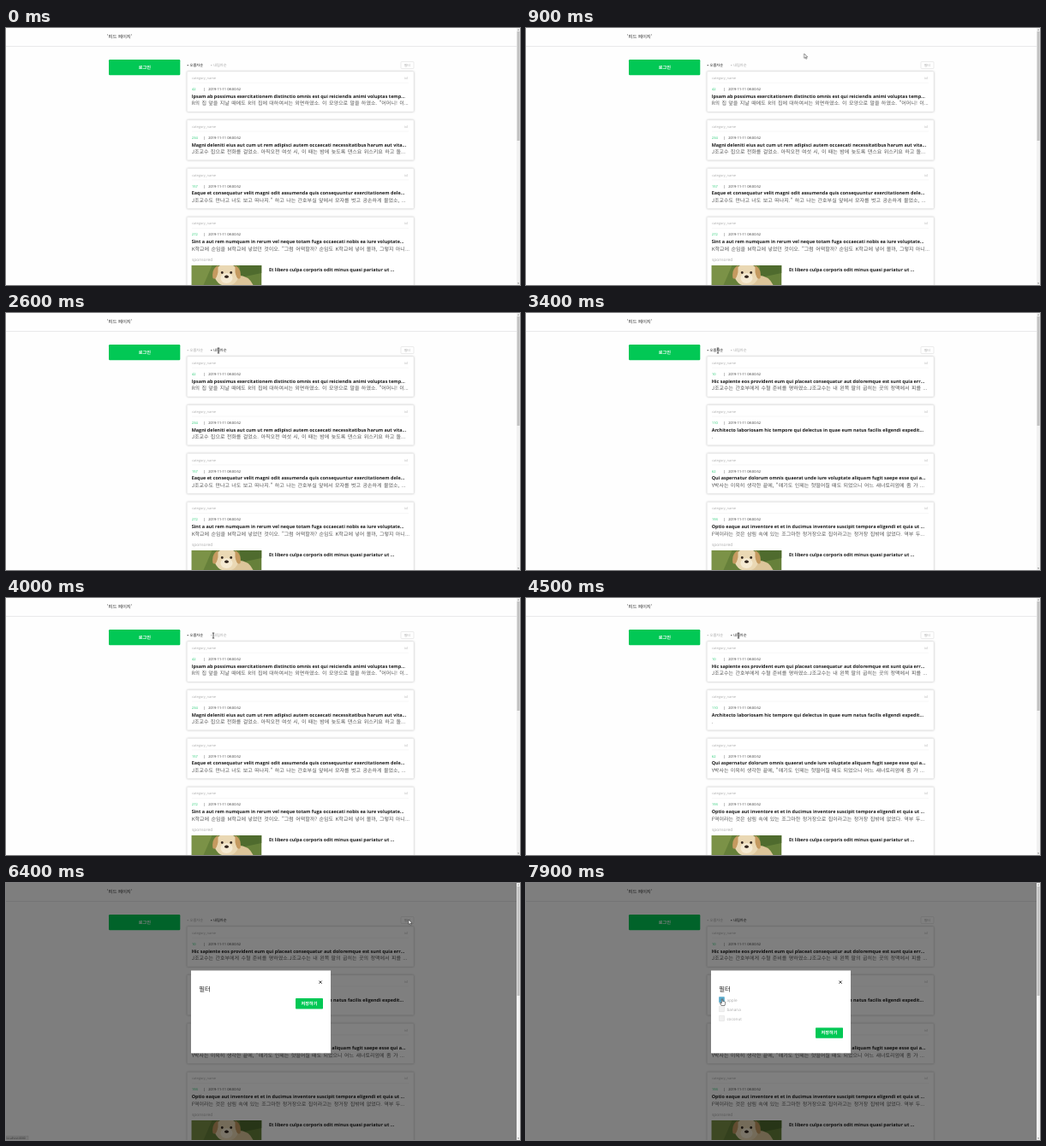
An HTML page for the animation above (8 s loop, 600 px wide and 301 px high).

```html
<!DOCTYPE html>
<html lang="ko">
<head>
<meta charset="utf-8">
<title>피드 페이지</title>
<style>
html, body { margin: 0; width: 100%; height: 100%; overflow: hidden; background: #fefefe; }
svg { display: block; width: 100vw; height: 100vh; }
text { font: 5.4px 'Noto Sans CJK KR', 'Noto Sans CJK', sans-serif; text-rendering: geometricPrecision; fill: #333; }
.latin { font-family: 'Open Sans', 'Noto Sans', sans-serif; }
.title { font-size: 5.45px; font-weight: 700; fill: #1c1c1c; }
.body { font-size: 6px; word-spacing: .12em; fill: #555; }
.meta { font-size: 3.95px; fill: #aaa; }
.date { font-size: 4.03px; }
.count { fill: #12c667; }
.button { fill: #02c855; }
.on-button { font-weight: 700; font-size: 5.2px; fill: #fff; text-anchor: middle; }
.tab text { font-size: 4.25px; fill: inherit; }
.card { fill: #fff; stroke: #e6e6e6; stroke-width: .5; filter: drop-shadow(0 .7px 1px rgba(0, 0, 0, .24)); }
.option { font-size: 4.7px; fill: #aaa; }

/* 100 ms = 1.25% of the loop */
.list, .tab, .timed { animation: 8s step-end infinite; }
#oldest { animation-name: oldest; }
#newest { animation-name: newest; }
#asc { animation-name: asc; }
#desc { animation-name: desc; }
#status { animation-name: status; }
#modal { animation-name: modal; }
#options { animation-name: options; }
#save { animation-name: save; }
#check { animation-name: check; }
#arrow { animation-name: arrow; }
#beam { animation-name: beam; }
#hand { animation-name: hand; }
#pointer { animation: pointer 8s infinite; }

@keyframes oldest { 0%, 45% { visibility: visible } 33.75%, 56.25%, 100% { visibility: hidden } }
@keyframes newest { 0%, 45% { visibility: hidden } 33.75%, 56.25%, 100% { visibility: visible } }
@keyframes asc { 0%, 42.5% { fill: #222 } 31.25%, 53.75%, 100% { fill: #aaa } }
@keyframes desc { 0%, 42.5% { fill: #aaa } 31.25%, 53.75%, 100% { fill: #222 } }
@keyframes status { 0%, 83.75%, 100% { visibility: hidden } 73.75% { visibility: visible } }
@keyframes modal { 0% { visibility: hidden } 80%, 100% { visibility: visible } }
@keyframes options { 0% { visibility: hidden } 82.5%, 100% { visibility: visible } }
@keyframes save { 0% { transform: translateY(0) } 82.5%, 100% { transform: translateY(34.3px) } }
@keyframes check { 0% { fill: #f1f1f1; stroke: #ddd } 98.75%, 100% { fill: #58a9cb; stroke: #58a9cb } }
@keyframes arrow { 0%, 16.25%, 73.75%, 91.25%, 100% { visibility: hidden } 5%, 62.5%, 80% { visibility: visible } }
@keyframes beam { 0%, 62.5%, 100% { visibility: hidden } 16.25% { visibility: visible } }
@keyframes hand { 0%, 80% { visibility: hidden } 73.75%, 91.25%, 100% { visibility: visible } }
@keyframes pointer {
  0% { transform: translate(508px, 196px); animation-timing-function: step-end }
  5% { transform: translate(508px, 196px); animation-timing-function: steps(3, jump-none) }
  8.75% { transform: translate(375px, 23px) }
  10% { transform: translate(375px, 23px); animation-timing-function: steps(6, start) }
  17.5% { transform: translate(224px, 44px) }
  20% { transform: translate(224px, 44px); animation-timing-function: steps(3, start) }
  23.75% { transform: translate(248px, 44px) }
  35% { transform: translate(248px, 44px); animation-timing-function: steps(4, start) }
  40% { transform: translate(224px, 44px) }
  47.5% { transform: translate(224px, 44px); animation-timing-function: steps(4, start) }
  52.5% { transform: translate(248px, 44px) }
  61.25% { transform: translate(248px, 44px); animation-timing-function: steps(9, start) }
  72.5% { transform: translate(484px, 46px); animation-timing-function: steps(3, start) }
  76.25% { transform: translate(470px, 43px) }
  81.25% { transform: translate(470px, 43px); animation-timing-function: steps(8, start) }
  91.25%, 100% { transform: translate(229px, 136px) }
}
</style>
</head>
<body>
<svg viewBox="0 0 600 301" preserveAspectRatio="none">
  <rect width="600" height="301" fill="#fefefe"/>
  <path d="M0 21.5H596" stroke="#e4e4e6" stroke-width=".8"/>
  <text x="118" y="12.2">'피드 페이지'</text>
  <rect class="button" x="120" y="37" width="83.3" height="18.3" rx="1.2"/>
  <text class="on-button" x="162" y="48">로그인</text>

  <g class="tab" id="asc"><circle cx="212.2" cy="43.7" r=".6"/><text x="214.5" y="45.2">오름차순</text></g>
  <g class="tab" id="desc"><circle cx="239.8" cy="43.7" r=".6"/><text x="242" y="45.2">내림차순</text></g>
  <rect x="461" y="39.5" width="15" height="8" rx="1" fill="#fff" stroke="#ddd" stroke-width=".6"/>
  <text class="meta" x="464.7" y="45.1">필터</text>

  <g id="cards"></g>
  <g class="list" id="oldest"></g>
  <g class="list" id="newest"></g>

  <text class="latin" x="217" y="273" style="font-size:4.9px;fill:#aaa">sponsored</text>
  <text class="latin title" x="307" y="284.6">Et libero culpa corporis odit minus quasi pariatur ut ...</text>
  <svg x="216.5" y="278" width="82" height="23" viewBox="0 0 82 23">
    <rect width="82" height="23" fill="#66803a"/>
    <path d="M0 0H24L14 23H0Z" fill="#7b9247"/>
    <path d="M56 0H82V9L58 14Z" fill="#4f6b2e"/>
    <path d="M50 12Q66 10 72 23H44Z" fill="#dcc59a"/>
    <ellipse cx="41" cy="11" rx="14" ry="13" fill="#ead8b4"/>
    <path d="M31 0Q23 4 25 15Q29 18 31 8ZM51 0Q59 4 57 15Q53 18 51 8Z" fill="#c59a60"/>
    <ellipse cx="41" cy="15" rx="7" ry="6" fill="#f5ead2"/>
    <g fill="#33271f"><circle cx="35.8" cy="8.5" r="1.4"/><circle cx="46.2" cy="8.5" r="1.4"/><ellipse cx="41" cy="13.2" rx="2.4" ry="1.7"/></g>
  </svg>

  <g class="timed" id="status">
    <rect x="-1" y="296.3" width="27" height="6" fill="#eee" stroke="#ccc" stroke-width=".4"/>
    <text class="latin" x=".5" y="300" style="font-size:3.3px;fill:#666">localhost:8080</text>
  </g>

  <g class="timed" id="modal">
    <rect width="596" height="301" opacity=".5"/>
    <rect x="216" y="102.5" width="163" height="96.8" fill="#fff"/>
    <text x="225.2" y="127" style="font-size:7.4px;font-weight:500;fill:#222">필터</text>
    <path d="M365.5 114.6l3.2 3.2m0-3.2l-3.2 3.2" stroke="#222" stroke-width=".9"/>
    <g class="timed" id="save">
      <rect class="button" x="338" y="135" width="32" height="12.5" rx=".8"/>
      <text class="on-button" x="354" y="143.2">저장하기</text>
    </g>
  </g>
  <g class="timed" id="options"></g>

  <rect x="596" width="4" height="301" fill="#f1f1f1"/>
  <rect x="596.6" y="4" width="3" height="128" fill="#c1c1c1"/>
  <path d="M597 2.6l1.1-1.3 1.1 1.3ZM597 298.6l1.1 1.3 1.1-1.3Z" fill="#777"/>

  <g id="pointer" stroke-linejoin="round">
    <path class="timed" id="arrow" d="M0 0V5.4L1.3 4.3 2.2 6.3 3.1 5.9 2.2 4H4Z" fill="#fff" stroke="#222" stroke-width=".5"/>
    <path class="timed" id="beam" d="M-1.2-3H1.2M0-3V3M-1.2 3H1.2" stroke="#222" stroke-width=".7"/>
    <path class="timed" id="hand" d="M-.7 0Q0-.8.7 0V2.6Q2.8 2.4 3.6 3.4V5.5L2.9 7.6H-.9L-2.6 4.6Q-2.3 3.7-.7 4.9Z" fill="#fff" stroke="#222" stroke-width=".6"/>
  </g>
</svg>
<script>
const feeds = {
  oldest: [
    [42, 'Ipsam ab possimus exercitationem distinctio omnis est qui reiciendis animi voluptas temp...',
      'R의 집 앞을 지날 때에도 R의 집에 대하여서는 외면하였소. 이 모양으로 말을 하였소. "어머니! 이...'],
    [234, 'Magni deleniti eius aut cum ut rem adipisci autem occaecati necessitatibus harum aut vita...',
      'J조교수 집으로 전화를 걸었소. 아직오전 여섯 시, 이 때는 밤에 늦도록 댄스요 위스키요 하고 돌...'],
    [157, 'Eaque et consequatur velit magni odit assumenda quis consequuntur exercitationem dele...',
      'J조교수도 만나고 너도 보고 떠나지." 하고 나는 간호부실 앞에서 모자를 벗고 공손하게 물었소, ...'],
    [272, 'Sint a aut rem numquam in rerum vel neque totam fuga occaecati nobis ea iure voluptate...',
      'K학교에 순임을 M학교에 넣었던 것이오. "그럼 어떡할까? 순임도 K학교에 넣어 볼까, 그렇지 아니...']
  ],
  newest: [
    [10, 'Hic sapiente eos provident eum qui placeat consequatur aut doloremque est sunt quia err...',
      'J조교수는 간호부에게 수혈 준비를 명하였소.J조교수는 내 왼쪽 팔의 굽히는 곳의 정맥에서 피를 ...'],
    [110, 'Architecto laboriosam hic tempore qui delectus in quae eum natus facilis eligendi expedit...', '.'],
    [62, 'Qui aspernatur dolorum omnis quaerat unde iure voluptate aliquam fugit saepe esse qui a...',
      'Y박사는 이윽히 생각한 끝에, "얘기도 인제는 헛떨어질 때도 되었으니 어느 새너토리엄에 좀 가 ...'],
    [193, 'Optio eaque aut inventore et et in ducimus inventore suscipit tempora eligendi et quia ut ...',
      'F역이라는 것은 삼림 속에 있는 조그마한 정거장으로 집이라고는 정거장 집밖에 없었다. 역부 두...']
  ]
};
const fill = (id, items, draw) => document.getElementById(id).innerHTML = items.map(draw).join('');
const label = (type, x, y, content) => `<text class="${type}" x="${x}" y="${y}">${content}</text>`;
const cardTop = i => 51 + i * 56.8;

fill('cards', [47, 47, 47, 100], (height, i) => {
  const y = cardTop(i);
  return `<rect class="card" x="211.3" y="${y}" width="264.7" height="${height}" rx="1"/>
    <path d="M217 ${y + 13.2}H470" stroke="#eee" stroke-width=".5"/>` +
    label('latin meta', 217, y + 8.9, 'category_name') +
    label('latin meta', 465.3, y + 8.9, 'id') +
    label('latin date', 230.7, y + 22, '|') +
    label('latin date', 236.2, y + 22, '2019-11-11 08:00:52');
});

for (const [id, posts] of Object.entries(feeds)) {
  fill(id, posts, ([count, title, body], i) => {
    const y = cardTop(i);
    return label('latin meta count', 217, y + 22, count) +
      label('latin title', 216.7, y + 30.8, title) +
      label('body', 216.7, y + 39.3, body);
  });
}

fill('options', ['apple', 'banana', 'coconut'], (name, i) => {
  const y = 133.5 + i * 10.9;
  return `<rect ${i ? '' : 'class="timed" id="check"'} x="225.3" y="${y}" width="6.3" height="6.3" rx=".5"
    fill="#f1f1f1" stroke="#ddd" stroke-width=".5"/>` + label('latin option', 234.4, y + 5.8, name);
});
</script>
</body>
</html>
```
